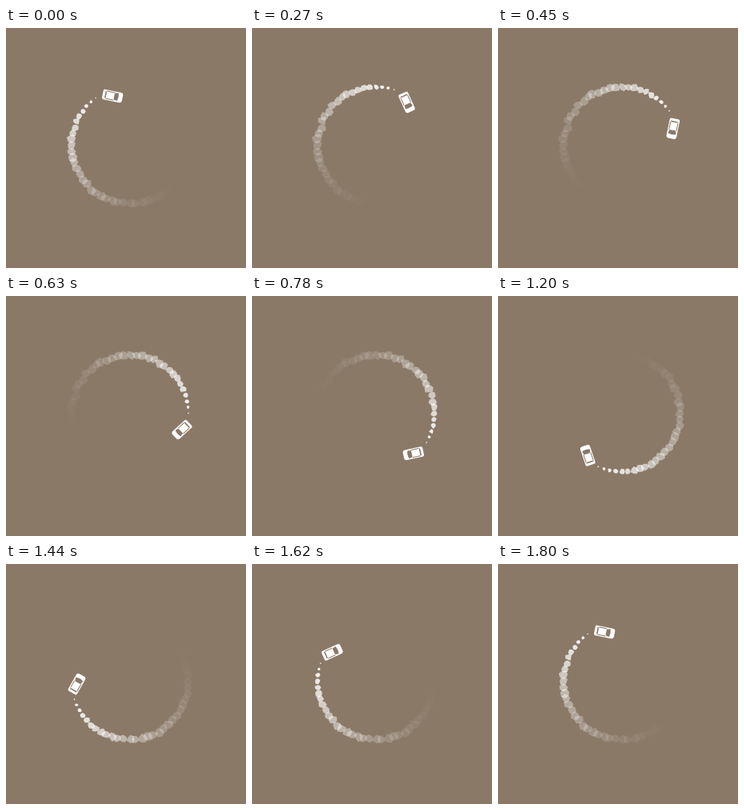
Write an HTML page with a canvas that moves like this. It is 300 px wide and 300 px high and loops after 1830 ms.

```html
<!DOCTYPE html>
<html lang="en">
<head>
<meta charset="utf-8">
<title>Drifting car</title>
<style>
html, body { margin: 0; width: 100%; height: 100%; overflow: hidden; background: #8a7967; }
canvas { display: block; }
</style>
</head>
<body>
<canvas id="stage" width="300" height="300"></canvas>
<script>
const ctx = document.getElementById('stage').getContext('2d');
const BG = '#8a7967', LOOP = 1830, STEP = 30, TURN = 60, LIFE = 34;
const rad = deg => deg * Math.PI / 180;

// Repeatable noise in 0..1
function noise(n, salt) {
  const v = Math.sin(n * 127.1 + salt * 311.7) * 43758.5453;
  return v - Math.floor(v);
}

function polygon(points, color) {
  ctx.fillStyle = color;
  ctx.beginPath();
  points.forEach(([x, y]) => ctx.lineTo(x, y));
  ctx.fill();
}

function puff(step, age) {
  const id = (step - age + TURN) % TURN;
  const angle = rad(234 + 6 * (step - age));
  const spread = Math.min(1, age / 12) * 2.4;
  const x = 155 + 73 * Math.cos(angle) + (noise(id, 1) - .5) * spread;
  const y = 146.6 + 73 * Math.sin(angle) + (noise(id, 2) - .5) * spread;
  const size = 5.8 * (1 - Math.exp(-(age + .7) / 4.2));
  const points = [];
  for (let i = 0; i < 7; i++) {
    const a = i * Math.PI * 2 / 7 + noise(id, 3) * 6;
    const r = size * (.75 + .45 * noise(id, 4 + i));
    points.push([x + r * Math.cos(a), y + r * Math.sin(a)]);
  }
  ctx.globalAlpha = (1 - age / LIFE) ** 2;
  polygon(points, '#fff');
  ctx.globalAlpha = 1;
}

function car(step) {
  const deg = 250.5 + 6 * step, a = rad(deg);
  ctx.save();
  ctx.translate(155.6 + 67 * Math.cos(a), 148.2 + 67 * Math.sin(a));
  ctx.rotate(rad(deg + 121));
  ctx.fillStyle = '#fff';
  ctx.beginPath();
  ctx.roundRect(-12.6, -6.4, 25.2, 12.8, [2, 3.2, 3.2, 2]);
  ctx.fill();
  // Rear window, side windows, windshield
  polygon([[-9.6, -4.8], [-8, -4], [-8, 4], [-9.6, 4.8]], BG);
  for (const side of [-1, 1])
    polygon([[-8.6, 5.2 * side], [2.6, 5.2 * side], [1.4, 4.2 * side], [-7.4, 4.2 * side]], BG);
  ctx.fillStyle = BG;
  ctx.beginPath();
  ctx.moveTo(2, -4);
  ctx.lineTo(6.4, -5.1);
  ctx.quadraticCurveTo(8.6, 0, 6.4, 5.1);
  ctx.lineTo(2, 4);
  ctx.fill();
  ctx.restore();
}

function draw() {
  const step = Math.floor(performance.now() % LOOP / STEP);
  ctx.fillStyle = BG;
  ctx.fillRect(0, 0, 300, 300);
  for (let age = LIFE - 1; age >= 0; age--) puff(step, age);
  car(step);
  requestAnimationFrame(draw);
}
draw();
</script>
</body>
</html>
```
